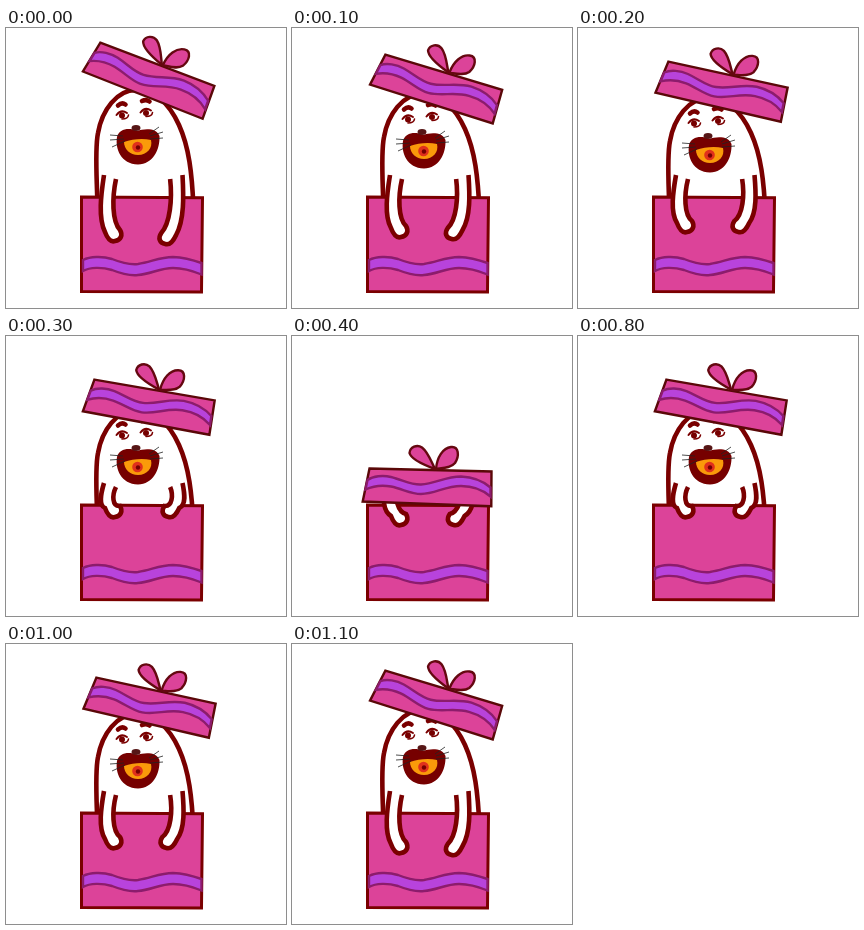
An HTML page for the animation above (1.2 s loop, 280 px wide and 280 px high).

```html
<!DOCTYPE html>
<html lang="en">
<head>
<meta charset="utf-8">
<title>Surprise box</title>
<style>
  html, body { margin: 0; width: 100%; height: 100%; overflow: hidden; background: #fff; }
  svg { display: block; width: 100vw; height: 100vh; }
  .line { fill: none; stroke: #7a0000; stroke-linecap: round; stroke-linejoin: round; }
  .box { fill: #dc4399; stroke: #7a0000; stroke-width: 3; }
  .lid { fill: #dc4399; stroke: #5a0808; stroke-width: 2.4; }
  .bow { fill: #dc4399; stroke: #650810; stroke-width: 2.4; stroke-linejoin: round; }
  .band { fill: #b843dc; stroke: #8c1c6c; stroke-width: 2.4; }
  .white { fill: #fff; stroke: #7a0000; stroke-width: 4.6; }
  .dark { fill: #760000; }
  .whisker { fill: none; stroke: #222; stroke-width: .8; }
</style>
</head>
<body>
<svg viewBox="0 0 280 280">
  <g id="body">
    <path class="white" d="M91.500 180 C91 150 88.500 122 92 105 C96 82 111 62 130 62 C148 62 163 75 173 97 C183 119 186 145 187.500 180"/>
  </g>

  <path class="box" d="M75.500 169 L196.500 169.800 L195.500 264 L75.500 263.500 Z"/>
  <path class="band" d="M77 232 C84 228.500 96 228 106 231 C116 235 123 237 132 236 C145 234 154 229 167 229 C178 229.500 187 232 195.500 235 V246.500 C187 243 178 240 167 240 C154 240 145 246 132 247 C123 248 116 246 106 242 C96 239 84 239 77 243 Z"/>

  <path id="armL" class="white"/>
  <path id="armR" class="white"/>

  <g id="face">
    <path class="line" stroke-width="4.600" d="M112 77.500 Q116 74 119.500 76.500"/>
    <path class="line" stroke-width="4.600" d="M136 73 Q140 71 143.500 73.500"/>
    <g id="eye">
      <path class="line" stroke-width="2" d="M110.500 87 Q115 81 121 85"/>
      <circle class="dark" cx="116" cy="87.500" r="3"/>
      <path class="line" stroke-width="1.600" d="M116 91 Q122 91 122.500 87"/>
    </g>
    <use href="#eye" x="24" y="-2.500"/>
    <path class="dark" d="M131 103 C123 99 113 101 111 109 C109 121 115 136 132 136.500 C147 136 154 122 153.500 108 C151 100 139 100 131 103 Z"/>
    <path fill="#fa9a0a" d="M118 114 C126 111 137 110 145 112 C147 120 141 127 132 127 C124 127 118 121 118 114 Z"/>
    <circle fill="#e0301c" cx="131.500" cy="119" r="5.300"/>
    <circle class="dark" cx="132" cy="119.500" r="2.200"/>
    <ellipse fill="#561616" cx="130" cy="100" rx="4.500" ry="3"/>
    <path class="whisker" d="M104 107 L117 108 M104 112 L118 111 M106 119 L119 113 M143 106 L153 99 M144 108 L157 104 M144 111 L157 110"/>
  </g>

  <g id="lid">
    <path class="lid" d="M.5 .5 L122.500 3.500 L122.300 38.300 L-6.300 33.500 Z"/>
    <path class="band" d="M-1.500 12 C4 8 14 7 22 9 C34 12 42 17 52 16.500 C66 16 76 8.500 92 8.500 C104 9 114 13 121.500 19.500 V28.500 C114 22 104 18 92 18 C76 18 66 26 52 26 C42 26 34 21 22 18.500 C14 17 4 18 -3.500 21.500 Z"/>
    <path class="bow" d="M66 1 C55 -3 42 -9 40.500 -15 C41 -21 48 -24 53 -20.500 C59 -16 62 -7 66 1 Z"/>
    <path class="bow" d="M67 1 C68 -11 74 -20 82 -21 C90 -22 90.500 -12 86 -5 C82 0 74 0 67 1 Z"/>
  </g>
</svg>
<script>
const $ = id => document.getElementById(id);
const LOOP = 1200;

// lid x, y, angle; body drop; arm tips; outward lean of the arms
const poses = {
  high:   { lid: [94, 14, 19.4],  drop: 0,  tips: [213, 216], lean: 0 },
  upper:  { lid: [93, 26, 15.4],  drop: 4,  tips: [209, 211], lean: 0 },
  middle: { lid: [90, 33, 10.9],  drop: 8,  tips: [204, 204], lean: 0 },
  low:    { lid: [88, 43, 8.4],   drop: 12, tips: [181, 181], lean: 0 },
  shut:   { lid: [77, 132, 0],    drop: null, tips: [189, 189], lean: 4 }
};

const steps = [
  [0, 'high'], [100, 'upper'], [200, 'middle'], [300, 'low'],
  [400, 'shut'], [800, 'low'], [1000, 'middle'], [1100, 'upper']
];

// Arm hanging over the rim; the right one is mirrored and slopes inwards
function arm(tip, lean, right) {
  const top = 147, h = tip - top;
  const p = (x, y) => `${right ? 274.5 - x - .09 * (y - top) : x} ${y}`;
  const down = k => top + h * k;
  return `M${p(98 - lean, top)}` +
    `C${p(95 - lean, down(.3))} ${p(92 - lean / 2, down(.65))} ${p(99, tip - 9)}` +
    `C${p(102, tip - 1)} ${p(106, tip + 1)} ${p(109, tip)}` +
    `C${p(115, tip - 1)} ${p(117, tip - 6)} ${p(114, tip - 11)}` +
    `C${p(106, down(.7))} ${p(106 - lean, down(.35))} ${p(110 - lean, top + 4)}`;
}

function show({ lid: [x, y, angle], drop, tips, lean }) {
  $('lid').setAttribute('transform', `translate(${x} ${y}) rotate(${angle})`);
  for (const id of ['body', 'face']) {
    $(id).style.display = drop === null ? 'none' : '';
    $(id).setAttribute('transform', `translate(0 ${drop || 0})`);
  }
  $('armL').setAttribute('d', arm(tips[0], lean, false));
  $('armR').setAttribute('d', arm(tips[1], lean, true));
}

let current;
function tick() {
  const t = performance.now() % LOOP;
  const name = steps.findLast(([start]) => start <= t)[1];
  if (name !== current) show(poses[current = name]);
  requestAnimationFrame(tick);
}
tick();
</script>
</body>
</html>
```
